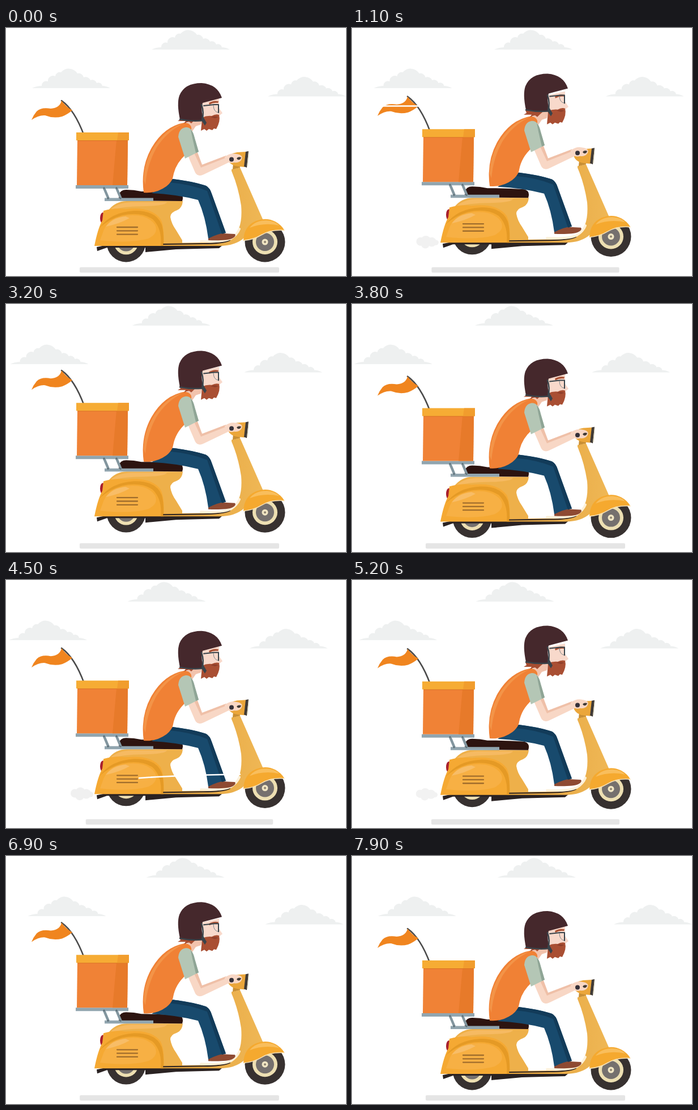
An HTML page that plays this animation: 600x437 px, repeating every 8000 ms.

```html
<!DOCTYPE html>
<html lang="en">
<head>
<meta charset="utf-8">
<title>Scooter delivery</title>
<style>
html, body { margin: 0; width: 100%; height: 100%; overflow: hidden; background: #fff; }
svg { display: block; width: 100%; height: 100%; }
.line { fill: none; stroke-linecap: round; stroke-linejoin: round; }
</style>
</head>
<body>
<svg viewBox="0 0 600 437">
  <defs>
    <path id="cloud" fill="#eef0f0" d="M0 34Q8 30 17 30A8 8 0 0 1 28 22A9 9 0 0 1 41 13A8 8 0 0 1 51 6A18 18 0 0 1 80 8A9 9 0 0 1 91 15A9 9 0 0 1 103 20A8 8 0 0 1 114 25A7 7 0 0 1 124 30Q131 30 138 34Z"/>
    <g id="wheel">
      <circle r="35.5" fill="#373130"/>
      <circle r="22" fill="#eddfb2"/>
      <circle r="16" fill="#75706e"/>
      <circle r="5.5" fill="#f1e6c4"/>
      <circle r="2" fill="#8d8271"/>
    </g>
    <linearGradient id="shield">
      <stop offset=".2" stop-color="#e5a53f"/>
      <stop offset="1" stop-color="#efb755"/>
    </linearGradient>
  </defs>

  <use id="cloudTop" href="#cloud"/>
  <use id="cloudLeft" href="#cloud"/>
  <use id="cloudRight" href="#cloud"/>
  <rect id="shadow" y="421.5" height="9.5" rx="2" fill="#e5e5e5"/>

  <g id="smoke" fill="#ececec">
    <circle cx="-13" cy="-1" r="8"/><circle cx="-3" cy="-3" r="9"/>
    <circle cx="8" cy="0" r="9"/><circle cx="16" cy="1" r="5"/>
    <circle cx="-4" cy="4" r="8"/>
  </g>

  <g id="flag">
    <path class="line" stroke="#4b4b4b" stroke-width="2.6" d="M98 128Q121 144 138 190"/>
    <path fill="#f0851f" d="M98 128Q95 141 79 142Q62 139 54 147Q48 154 45 162Q58 153 69 154Q84 160 99 156Q109 152 117 145Q106 139 98 128Z"/>
  </g>

  <g id="rearWheel"><use href="#wheel" transform="translate(212 378) scale(.97)"/></g>
  <g id="frontWheel"><use href="#wheel" transform="translate(457 377)"/></g>

  <g id="scooter">
    <path fill="#2a2222" d="M160 386L180 382H383L376 388Q335 389 300 390L246 395V387H178L161 393Z"/>
    <ellipse cx="171" cy="335" rx="5" ry="10" fill="#a9202d"/>
    <path fill="#eeb04a" d="M172 345Q170 325 180 322Q193 305 213 305H312Q311 317 302 321Q290 325 290 333Q292 345 300 356L311 374V381H240Z"/>
    <path fill="#f6ba62" d="M182 322Q196 308 220 307H284Q282 313 245 314Q203 314 182 322Z"/>
    <path fill="#f5a933" d="M156 384Q162 353 170 339L172 322Q193 316 211 319Q257 314 273 337Q280 350 278 384Z"/>
    <path fill="#e59a25" d="M165 352Q186 324 226 322Q265 321 275 347Q279 362 278 384H273Q276 354 259 337Q238 323 205 330Q181 337 165 352Z"/>
    <path fill="#f7b044" d="M170 363Q178 335 210 331Q249 326 263 347Q270 362 251 371Q220 380 166 374Z"/>
    <path fill="#f8bd67" d="M176 350Q188 334 211 332L218 335Q200 345 176 350Z"/>
    <path class="line" stroke="#a16e2c" stroke-width="2.3" d="M196 351H232M196 357.3H232M196 363.6H232"/>
    <path fill="#2d1410" d="M199 304V294Q202 285 212 285Q226 285 239 288Q274 288 304 290Q315 293 311 305Z"/>
    <path fill="url(#shield)" d="M398 249L413 246L454 339Q434 354 421 369Q405 384 376 384H278V379L361 378Q401 377 411 353Q417 338 415 313Q410 280 398 252Z"/>
    <path class="line" stroke="#2f2522" stroke-width="2" d="M278 381L348 380Q382 380 395 374"/>
    <path class="line" stroke="#fdf1d9" stroke-width="4" d="M344 376Q382 378 397 371Q408 364 412 354"/>
    <path fill="#c98f34" d="M401 238H412L413 246L400 249Z"/>
    <path fill="#eba63a" d="M391 230Q394 221 408 219L424 218L421 245L410 244Q394 242 391 230Z"/>
    <path fill="#403a36" d="M423 218L428 217L425 246L420 244Z"/>
    <path fill="#e6e1cc" d="M428 218L429 220L427 243L425 245Z"/>
    <path fill="#f5a92f" d="M419 374Q420 349 441 340Q459 333 475 341Q486 347 491 356Q468 354 451 364Q437 373 419 374Z"/>
    <path fill="#f9be5c" d="M430 352Q440 339 460 339Q475 340 482 348Q455 342 430 352Z"/>
    <path class="line" stroke="#fbe3b5" stroke-width="1.5" d="M419 374.5Q437 373 451 364.5Q468 354.5 491 356.5"/>
    <path class="line" stroke="#83969f" stroke-width="4.5" d="M173 282L181 301M195 282L203 301"/>
    <path fill="#91a5af" d="M123 277H216V283H123ZM174 299.5H260V305H174Z"/>
    <g fill="#60727b"><circle cx="173" cy="282" r="1.7"/><circle cx="195" cy="282" r="1.7"/><circle cx="180" cy="300" r="1.7"/><circle cx="202" cy="300" r="1.7"/></g>
    <path fill="#f08236" d="M126 197H215L214 277H125Z"/>
    <path fill="#e77a2a" d="M195 197H215L214 277H188Z"/>
    <path fill="#d97025" d="M126 197H215V199H126Z"/>
    <path fill="#f6ac34" d="M124 184H217V198H124Z"/>
    <path fill="#f19d2d" d="M198 184H217V198H196Z"/>
  </g>

  <g id="rider">
    <path fill="#8e4a32" d="M357 374V369Q371 360 384 362L404 363Q407 367 399 371Q390 375 357 374Z"/>
    <path fill="#184a6d" d="M257 291L294 266Q330 270 353 278Q360 282 363 292L388 361Q374 362 357 371Q352 332 339 303Q300 293 257 291Z"/>
    <path fill="#123b59" d="M353 278Q360 282 363 292L388 361L381 363L355 287Q325 275 288 272L294 266Q332 271 353 278Z"/>
    <path fill="#f2c3ad" d="M319 168L335 150H348L344 170L335 173L328 183Z"/>
    <path fill="#f08135" d="M243 290Q237 246 257 211Q279 173 316 166.5Q331 170 326 182L317 223Q299 239 295 261Q294 270 283 279Q265 292 243 290Z"/>
    <path fill="#f39448" d="M243 268Q243 238 262 208Q285 175 313 168.5Q283 183 265 212Q249 241 246 276Z"/>
    <path fill="#f8d7c5" d="M321 225L337 217L346 241L388 225L397 235L349 258Q339 263 334 255Z"/>
    <path fill="#efc0a8" d="M332 220L337 217L346 241L388 225L390 228L344 246Z"/>
    <path fill="#b4c6b5" d="M304 192Q305 177 317 175Q328 174 332 191L340 218L316 230Z"/>
    <path fill="#8fa596" d="M326 179Q331 184 333 194L340 218L335 220L329 194Z"/>
    <path fill="#f8d7c5" d="M386 227Q396 219 407 222Q419 224 416 231Q413 238 403 237Q394 240 386 232Z"/>
    <circle cx="398" cy="231.5" r="4" fill="#35313a"/>
    <path fill="#403a36" d="M407 230Q409 226 415 228Q414 233 409 232Z"/>
    <path fill="#a64d31" d="M306 156H340L331 164L327 168L323 165L314 168L317 164L303 164L308 161Z"/>
    <path fill="#f8d9cb" d="M345 130L376 123L376 141L382 150L377 154L351 165Z"/>
    <path fill="#a95235" d="M358 132Q366 127 375 129L374 132Q366 131 359 135Z"/>
    <path fill="#a94f33" d="M346 158Q354 154 363 155Q370 151 376 153Q379 164 371 178L367 177L364 180L358 178L354 181L350 178L344 181L345 170Z"/>
    <path fill="#8d3e2a" d="M361 157Q368 154 375 157L369 159Z"/>
  </g>

  <g id="head">
    <path class="line" stroke="#7d878b" d="M366 136Q366 148 375 149"/>
    <path class="line" stroke="#37434a" stroke-width="2" d="M349 137L367 135H375V149"/>
    <path fill="#45282c" d="M307 161Q301 133 306 119Q315 97 345 97Q373 99 381 123L347 132Q344 143 347 155V164Q327 165 307 161Z"/>
    <path class="line" stroke="#39434a" stroke-width="2.5" d="M307 161Q328 165 346 163Q350 149 345 135"/>
    <path fill="#39434a" d="M346 153L354 167L351 172L345 163Z"/>
  </g>

  <g class="line" stroke="#fff" stroke-width="2.6">
    <path id="windHigh" d="M30 137.5H125"/>
    <path id="windLow" d="M235 349Q300 344 413 342.5"/>
  </g>
</svg>
<script>
const LOOP = 8000, STEP = 100, BOB = 4000;
const el = id => document.getElementById(id);
const move = (id, x, y) => el(id).setAttribute('transform', `translate(${x} ${y})`);
const ease = p => (1 - Math.cos(Math.PI * p)) / 2;

// Eased value at time t through [time, value] keys.
function track(keys, t) {
  const i = keys.findIndex(k => k[0] > t);
  const [t0, v0] = keys[i - 1], [t1, v1] = keys[i];
  return v0 + (v1 - v0) * ease((t - t0) / (t1 - t0));
}

const bounce = [[0, 0], [600, -7.2], [1900, -3], [3100, -10.2], [3900, 0], [BOB, 0]];
const wheelLift = [[0, 0], [600, 1], [3100, 0], [BOB, 0]];
const headLift = [[0, 0], [400, 0], [1200, -11.2], [1800, 0], [2000, 0], [2900, -6], [3900, 0], [BOB, 0]];
const flagLift = [[0, 0], [550, -8], [1000, -7.5], [1900, 0], [3100, -11.3], [3900, 0], [BOB, 0]];

function cloud(id, x, y, turn, t) {
  move(id, x + track([[0, 0], [turn, -42.5], [LOOP, 0]], t), y);
}

function wind(id, at, t) {
  const d = t - at;
  el(id).style.display = Math.abs(d) <= 100 ? '' : 'none';
  move(id, -d * 2, 0);
}

function draw(now) {
  const t = Math.floor(now % LOOP / STEP) * STEP, u = t % BOB;
  const y = track(bounce, u), k = track(wheelLift, u), lift = track(headLift, u);

  cloud('cloudTop', 257, 4, 4500, t);
  cloud('cloudLeft', 46, 72, 4000, t);
  cloud('cloudRight', 462, 86.5, 2800, t);

  move('scooter', 0, y);
  move('rearWheel', 0, y - 8 * k);
  move('frontWheel', 0, y - 4 * k);
  move('rider', 0, y + lift / 2);
  move('head', 0, y + lift);
  move('flag', 0, track(flagLift, u));

  const half = 176 - 11.5 * k;
  el('shadow').setAttribute('x', 306 - half);
  el('shadow').setAttribute('width', half * 2);

  el('smoke').setAttribute('transform',
    `translate(${106 + 30 * k} ${388 - 12 * k}) scale(${.35 + .65 * k})`);
  el('smoke').setAttribute('opacity', .85 * k * k);

  wind('windHigh', 1100, t);
  wind('windLow', 4500, t);
}

function tick() {
  draw(performance.now());
  requestAnimationFrame(tick);
}
tick();
</script>
</body>
</html>
```
